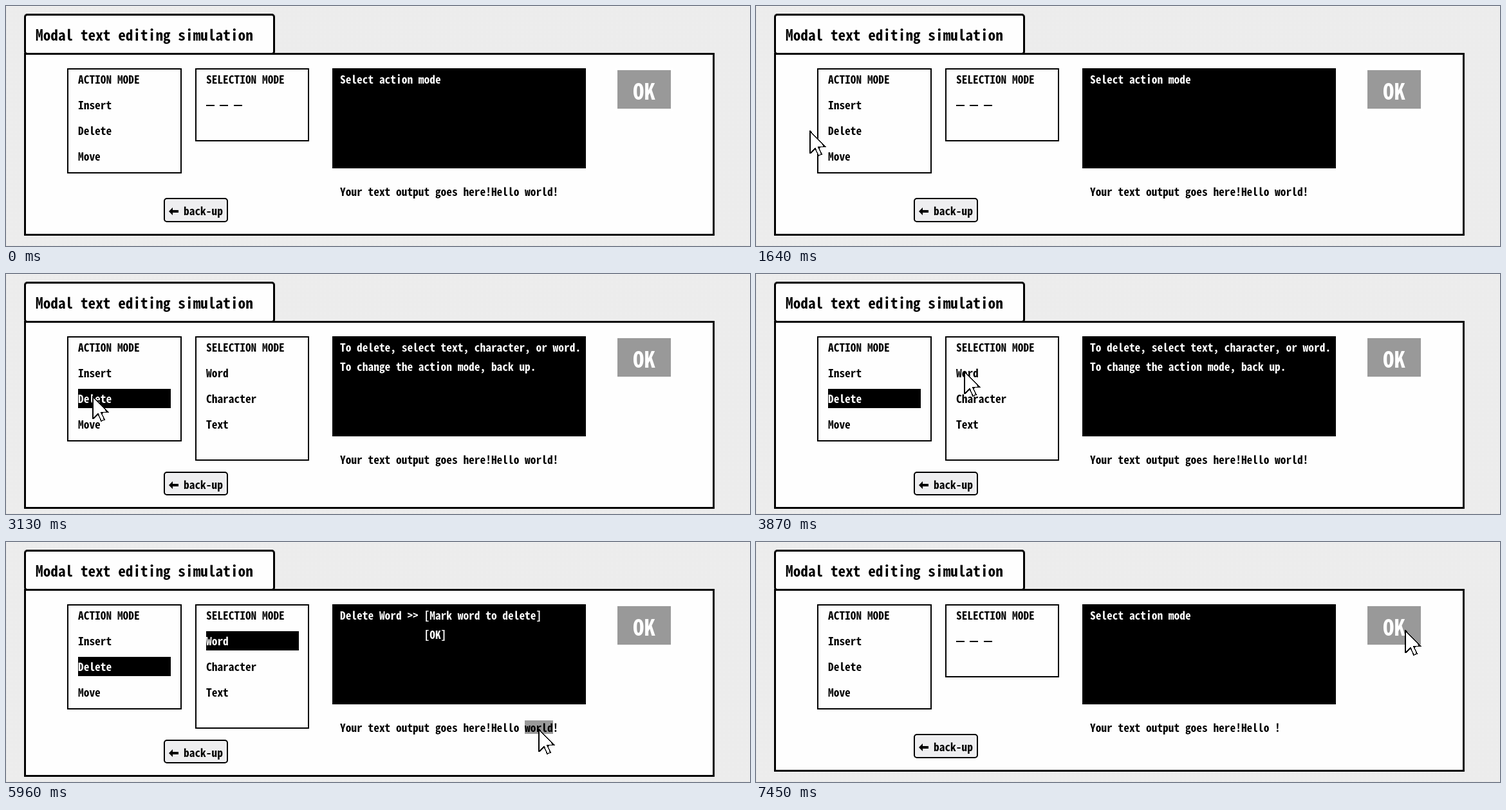
Recreate the animation shown at these times as an HTML page. Size 1156 px wide and 374 px high, loop 8000 ms.

```html
<!DOCTYPE html>
<html lang="en">
<head>
<meta charset="utf-8">
<title>Modal text editing simulation</title>
<style>
  * { box-sizing: border-box; }
  html, body { margin: 0; width: 100%; height: 100%; overflow: hidden; }
  body {
    position: relative;
    background: conic-gradient(#fff 25%, #fff 0 50%, #b4b4b4 0 75%, #fff 0) 0 0 / 2px 2px;
    color: #000;
    --cell: 8.7px;
    font: bold 17.4px/30px "Noto Sans Mono CJK JP", "Noto Sans Mono CJK SC", "Noto Sans Mono", monospace;
  }
  div, span, svg { position: absolute; }
  span {
    white-space: pre;
    letter-spacing: calc(var(--cell) - 1ch);
  }
  body > * { animation: 8s step-end infinite; }

  .panel { left: 28px; top: 73px; width: 1073px; height: 285px; border: 3px solid; background: #fefefe; animation-name: panel; }
  .tab { left: 28px; top: 12px; width: 390px; height: 64px; border: 3px solid; border-radius: 5px; background: #fefefe; }
  .title { left: 46px; top: 29px; font-size: 23.3px; --cell: 11.65px; }
  .box { top: 97px; border: 2px solid; }
  .actions { left: 95px; width: 178px; height: 164px; }
  .selections { left: 294px; width: 177px; height: 114px; animation-name: selections; }
  .console { left: 507px; top: 97px; width: 394px; height: 156px; background: #000; }
  .ok { left: 947px; top: 97px; width: 89px; height: 66px; border: 3px solid; background: #999; color: #fff; }
  .ok span { left: 24px; top: 16px; font-size: 35px; --cell: 17.5px; }
  .back { left: 245px; top: 299px; width: 100px; height: 38px; border: 2px solid; border-radius: 5px; background: #eeeef0; animation-name: back; }
  .back span { left: 29px; top: 3px; }
  .back svg { left: 6px; top: 13px; }
  .dashes { left: 311px; top: 154px; width: 56px; height: 2px; background: repeating-linear-gradient(90deg, #000 0 13px, #0000 0 21.4px); }

  .a { left: 112px; }
  .s { left: 311px; }
  .c { left: 519px; color: #fff; }
  .o { left: 519px; top: 274px; }
  .r1 { top: 99px; }
  .r2 { top: 139px; }
  .r3 { top: 179px; }
  .r4 { top: 219px; }
  .l2 { top: 129px; }
  .hot { width: 144px; height: 30px; background: #000; color: #fff; }
  .mark { left: 806px; top: 278px; width: 43.5px; height: 21px; background: #999; animation-name: mark; }

  .idle { animation-name: idle; }
  .busy { animation-name: busy; }
  .ask { animation-name: ask; }
  .word { animation-name: word; }
  .before { animation-name: before; }
  .after { animation-name: after; }
  .cursor { left: 0; top: 0; animation-name: cursor; }

  @keyframes panel { 31.75% { height: 293px; } 93.125% { height: 285px; } }
  @keyframes selections { 31.75% { height: 194px; } 93.125% { height: 114px; } }
  @keyframes back { 31.75% { top: 308px; height: 37px; } 93.125% { top: 299px; height: 38px; } }
  @keyframes idle { 0%, 93.125% { visibility: visible; } 31.75% { visibility: hidden; } }
  @keyframes busy { 0%, 93.125% { visibility: hidden; } 31.75% { visibility: visible; } }
  @keyframes ask { 0%, 52.125% { visibility: hidden; } 31.75% { visibility: visible; } }
  @keyframes word { 0%, 93.125% { visibility: hidden; } 52.125% { visibility: visible; } }
  @keyframes mark { 0%, 93.125% { visibility: hidden; } 74.5% { visibility: visible; } }
  @keyframes before { 0% { visibility: visible; } 93.125%, 100% { visibility: hidden; } }
  @keyframes after { 0% { visibility: hidden; } 93.125%, 100% { visibility: visible; } }
  @keyframes cursor {
    0% { transform: translate(-40px, 222px); }
    /* enter, rest on Delete */
    13.125% { transform: translate(-12px, 222px); }
    15% { transform: translate(8px, 214px); }
    16.75% { transform: translate(33px, 205px); }
    18.625% { transform: translate(59px, 198px); }
    20.5% { transform: translate(83px, 194px); }
    22.375% { transform: translate(103px, 191px); }
    24.25% { transform: translate(117px, 190px); }
    26.125% { transform: translate(124px, 190px); }
    28% { transform: translate(125px, 190px); }
    /* over to Word */
    39.125% { transform: translate(134px, 190px); }
    41% { transform: translate(176px, 181px); }
    42.75% { transform: translate(226px, 170px); }
    44.625% { transform: translate(275px, 160px); }
    46.5% { transform: translate(309px, 153px); }
    48.375% { transform: translate(323px, 151px); }
    /* down to the output */
    55.875% { transform: translate(400px, 163px); }
    57.75% { transform: translate(535px, 190px); }
    59.5% { transform: translate(651px, 223px); }
    61.375% { transform: translate(735px, 252px); }
    63.25% { transform: translate(785px, 271px); }
    65.125% { transform: translate(811px, 283px); }
    67% { transform: translate(822px, 289px); }
    68.875% { transform: translate(825px, 290px); }
    70.75% { transform: translate(827px, 291px); }
    /* up to OK */
    82% { transform: translate(862px, 260px); }
    83.875% { transform: translate(935px, 198px); }
    85.75% { transform: translate(990px, 151px); }
    87.5%, 100% { transform: translate(1008px, 137px); }
  }
</style>
</head>
<body>
  <div class="panel"></div>
  <div class="tab"></div>
  <span class="title">Modal text editing simulation</span>

  <div class="box actions"></div>
  <span class="a r1">ACTION MODE</span>
  <span class="a r2">Insert</span>
  <span class="a r3">Delete</span>
  <span class="a r4">Move</span>
  <span class="a r3 hot busy">Delete</span>

  <div class="box selections"></div>
  <span class="s r1">SELECTION MODE</span>
  <div class="dashes idle"></div>
  <span class="s r2 busy">Word</span>
  <span class="s r3 busy">Character</span>
  <span class="s r4 busy">Text</span>
  <span class="s r2 hot word">Word</span>

  <div class="console"></div>
  <span class="c r1 idle">Select action mode</span>
  <span class="c r1 ask">To delete, select text, character, or word.</span>
  <span class="c l2 ask">To change the action mode, back up.</span>
  <span class="c r1 word">Delete Word >> [Mark word to delete]</span>
  <span class="c l2 word">               [OK]</span>

  <div class="mark"></div>
  <span class="o before">Your text output goes here!Hello world!</span>
  <span class="o after">Your text output goes here!Hello !</span>

  <div class="ok"><span>OK</span></div>
  <div class="back">
    <svg width="15" height="12"><path d="M0 6 6 0V4H15V8H6V12Z"/></svg>
    <span>back-up</span>
  </div>

  <svg class="cursor" width="26" height="42" shape-rendering="crispEdges">
    <path d="M1 1V36L9 28 14 39 19 37 14 26 24 25Z" fill="#fff"/>
    <path d="M1 0V36" stroke="#000" stroke-width="2"/>
    <path d="M1 36 9 28 14 39 19 37 14 26 24 25 1 1" fill="none" stroke="#000" stroke-width="1.6"/>
  </svg>
</body>
</html>
```
